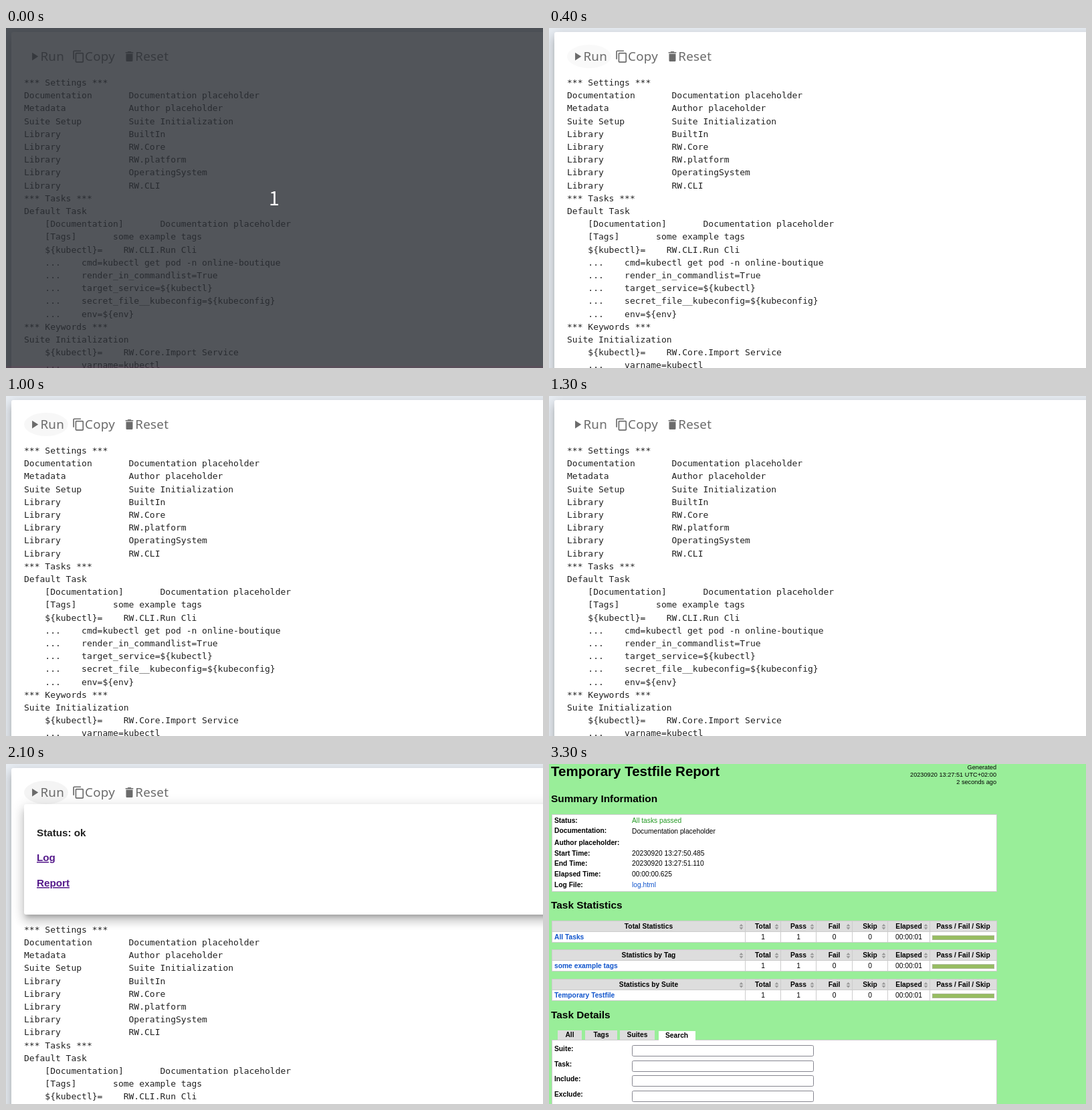
An HTML page for the animation above (4200 ms loop, 803 by 508 pixels).

```html
<!DOCTYPE html>
<html lang="en">
<head>
<meta charset="utf-8">
<title>Run and report</title>
<style>
html, body { margin: 0; width: 100%; height: 100%; overflow: hidden; background: #e9eef4; }
#stage { position: relative; width: 803px; height: 508px; overflow: hidden; background: #e9eef4; }
.card { position: absolute; background: #fff; border-radius: 3px;
  box-shadow: 0 6px 6px -3px rgba(0,0,0,.2), 0 10px 14px 1px rgba(0,0,0,.14), 0 4px 18px 3px rgba(0,0,0,.12); }
#page { left: 8px; top: 6px; width: 840px; height: 560px; }
#result { left: 27px; top: 60px; width: 820px; height: 165px; }
svg { position: absolute; left: 0; top: 0; display: block; }
text { white-space: pre; }
.tool { font: 18.75px "Noto Sans", "Open Sans", sans-serif; letter-spacing: .3px; }
.code { font: 13px "DejaVu Sans Mono", monospace; fill: #212121; }
.status { font: bold 15.2px "Liberation Sans", Arial, sans-serif; fill: #212121; }
.visited { fill: #551a8b; text-decoration: underline; }
.count { font: 28.7px "Noto Sans CJK JP", "Noto Sans CJK SC", "Noto Sans CJK", "DejaVu Sans", sans-serif; fill: #fff; }
#report { font: 10.27px "Liberation Sans", Arial, sans-serif; }
.b { font-weight: bold; }
.h1 { font-weight: bold; font-size: 20.5px; }
.h2 { font-weight: bold; font-size: 15.4px; }
.gen { font-size: 9.2px; }
.link { fill: #15c; }
.pass { fill: #292; }
</style>
</head>
<body>
<div id="stage">
  <div class="card" id="page"></div>
  <div class="card" id="result"></div>
  <svg id="art" width="803" height="508" viewBox="0 0 803 508"></svg>
</div>
<script>
const LOOP = 4200;
const $ = id => document.getElementById(id);

const text = (x, y, str, cls = '', anchor = 'start') =>
  `<text x="${x}" y="${y}" class="${cls}" text-anchor="${anchor}">${str}</text>`;
const rect = (x, y, w, h, fill, extra = '') =>
  `<rect x="${x}" y="${y}" width="${w}" height="${h}" fill="${fill}" ${extra}/>`;
const framed = (x, y, w, h, fill, stroke, rx = 0) =>
  rect(x + .5, y + .5, w - 1, h - 1, fill, `stroke="${stroke}" rx="${rx}"`);
const icon = (x, d) => `<path transform="translate(${x} 32.6) scale(.833)" d="${d}"/>`;

const CODE = [
  '*** Settings ***',
  'Documentation       Documentation placeholder',
  'Metadata            Author placeholder',
  'Suite Setup         Suite Initialization',
  'Library             BuiltIn',
  'Library             RW.Core',
  'Library             RW.platform',
  'Library             OperatingSystem',
  'Library             RW.CLI',
  '*** Tasks ***',
  'Default Task',
  '    [Documentation]       Documentation placeholder',
  '    [Tags]       some example tags',
  '    ${kubectl}=    RW.CLI.Run Cli',
  '    ...    cmd=kubectl get pod -n online-boutique',
  '    ...    render_in_commandlist=True',
  '    ...    target_service=${kubectl}',
  '    ...    secret_file__kubeconfig=${kubeconfig}',
  '    ...    env=${env}',
  '*** Keywords ***',
  'Suite Initialization',
  '    ${kubectl}=    RW.Core.Import Service',
  '    ...    varname=kubectl'
];

const code = top => CODE.map((line, i) => text(27, Math.round(top + i * 19.2), line, 'code')).join('');

function toolbar() {
  return '<ellipse id="hover" cx="60" cy="42.5" rx="33" ry="17.5"/><g fill="#6b6b6b">' +
    icon(32.4, 'M8 5v14l11-7z') + text(51.4, 49, 'Run', 'tool') +
    icon(98.6, 'M16 1H4c-1.1 0-2 .9-2 2v14h2V3h12V1zm3 4H8c-1.1 0-2 .9-2 2v14c0 1.1.9 2 2 2h11c1.1 0 2-.9 2-2V7c0-1.1-.9-2-2-2zm0 16H8V7h11v14z') +
    text(118, 49, 'Copy', 'tool') +
    icon(174.5, 'M6 19c0 1.1.9 2 2 2h8c1.1 0 2-.9 2-2V7H6v12zM19 4h-3.5l-1-1h-5l-1 1H5v2h14V4z') +
    text(193.2, 49, 'Reset', 'tool') + '</g>';
}

const done = () =>
  text(46, 108, 'Status: ok', 'status') +
  text(46, 145, 'Log', 'status visited') +
  text(46, 183, 'Report', 'status visited') + code(251.8);

const countdown = () =>
  rect(0, 0, 803, 508, 'rgba(42,46,52,.81)') +
  rect(0, 505, 803, 3, 'rgba(110,60,90,.25)') +
  text(401, 265, '1', 'count', 'middle');

const EDGES = [4, 293, 346, 399, 453, 506, 569, 669];
const HEADS = ['Total', 'Pass', 'Fail', 'Skip', 'Elapsed', 'Pass / Fail / Skip'];
const VALUES = ['1', '1', '0', '0', '00:00:01'];

function statTable(y, title, name) {
  const mid = i => (EDGES[i] + EDGES[i + 1] + 1) / 2;
  let s = rect(4, y, 666, 33, '#fff') + rect(4, y, 666, 17, '#ddd');
  for (const dy of [0, 16, 32]) s += rect(4, y + dy, 666, 1, '#ccc');
  for (const x of EDGES) s += rect(x, y, 1, 33, '#ccc');
  [title, ...HEADS].forEach((head, i) => {
    s += text(mid(i), y + 12, head, 'b', 'middle');
    if (i < 6) {
      const x = EDGES[i + 1] - 5.5;
      s += `<path fill="#999" d="M${x - 3} ${y + 8.5}l3-3.5 3 3.5zM${x - 3} ${y + 10}h6l-3 3.5z"/>`;
    }
  });
  s += text(8, y + 28, name, 'b link');
  VALUES.forEach((v, i) => s += text(mid(i + 1), y + 28, v, '', 'middle'));
  return s + framed(573, y + 22, 93, 7, '#97bd61', '#a9b892');
}

function report() {
  let s = rect(0, 0, 803, 508, '#9e9') +
    text(3, 18, 'Temporary Testfile Report', 'h1') +
    text(3, 57, 'Summary Information', 'h2') +
    text(3, 216, 'Task Statistics', 'h2') +
    text(3, 380, 'Task Details', 'h2');
  ['Generated', '20230920 13:27:51 UTC+02:00', '2 seconds ago'].forEach((line, i) =>
    s += text(669, 8 + 11 * i, line, 'gen', 'end'));

  s += framed(4, 75, 666, 116, '#fff', '#ccc');
  [
    [88, 'Status:', 'All tasks passed', 'pass'],
    [103, 'Documentation:', ''],
    [121, 'Author placeholder:', ''],
    [137, 'Start Time:', '20230920 13:27:50.485'],
    [152, 'End Time:', '20230920 13:27:51.110'],
    [168, 'Elapsed Time:', '00:00:00.625'],
    [184, 'Log File:', 'log.html', 'link']
  ].forEach(([y, label, value, cls]) => s += text(8, y, label, 'b') + text(124, y, value, cls));
  s += text(124, 104, 'Documentation placeholder');

  s += statTable(234, 'Total Statistics', 'All Tasks') +
    statTable(277, 'Statistics by Tag', 'some example tags') +
    statTable(321, 'Statistics by Suite', 'Temporary Testfile');

  s += framed(4, 412, 666, 110, '#fff', '#ccc');
  [[13, 36, 'All'], [54, 48, 'Tags'], [106, 52, 'Suites']].forEach(([x, w, label]) =>
    s += rect(x, 398, w, 14, '#ddd') + text(x + w / 2, 408, label, 'b', 'middle'));
  s += rect(164, 399, 55, 15, '#fff') + text(191, 409, 'Search', 'b', 'middle');
  ['Suite:', 'Task:', 'Include:', 'Exclude:'].forEach((label, i) => {
    const dy = Math.round(22.6 * i);
    s += text(8, 429 + dy, label, 'b') + framed(124, 420 + dy, 272, 17, '#fff', '#85858f', 2);
  });
  return s;
}

$('art').innerHTML = toolbar() +
  `<g id="editor">${code(86)}</g><g id="done">${done()}</g>` +
  `<g id="countdown">${countdown()}</g><g id="report">${report()}</g>`;

// Strength of the highlight behind the Run button, 0 to 1
function hoverAt(t) {
  if (t < 400) return 0;
  if (t < 500) return .5;
  if (t < 800) return .9;
  if (t < 1300) return 1 - Math.floor((t - 800) / 100) / 5.5;
  return t >= 2100 && t < 2300 ? .9 : 0;
}

function show(id, on) {
  $(id).style.display = on ? '' : 'none';
}

function draw(t) {
  const ran = t >= 1400;
  show('countdown', t < 100);
  show('editor', !ran);
  show('done', ran);
  show('result', ran);
  show('report', t >= 3300);
  $('hover').setAttribute('fill-opacity', .047 * hoverAt(t));
}

function tick() {
  draw(performance.now() % LOOP);
  requestAnimationFrame(tick);
}
tick();
</script>
</body>
</html>
```
